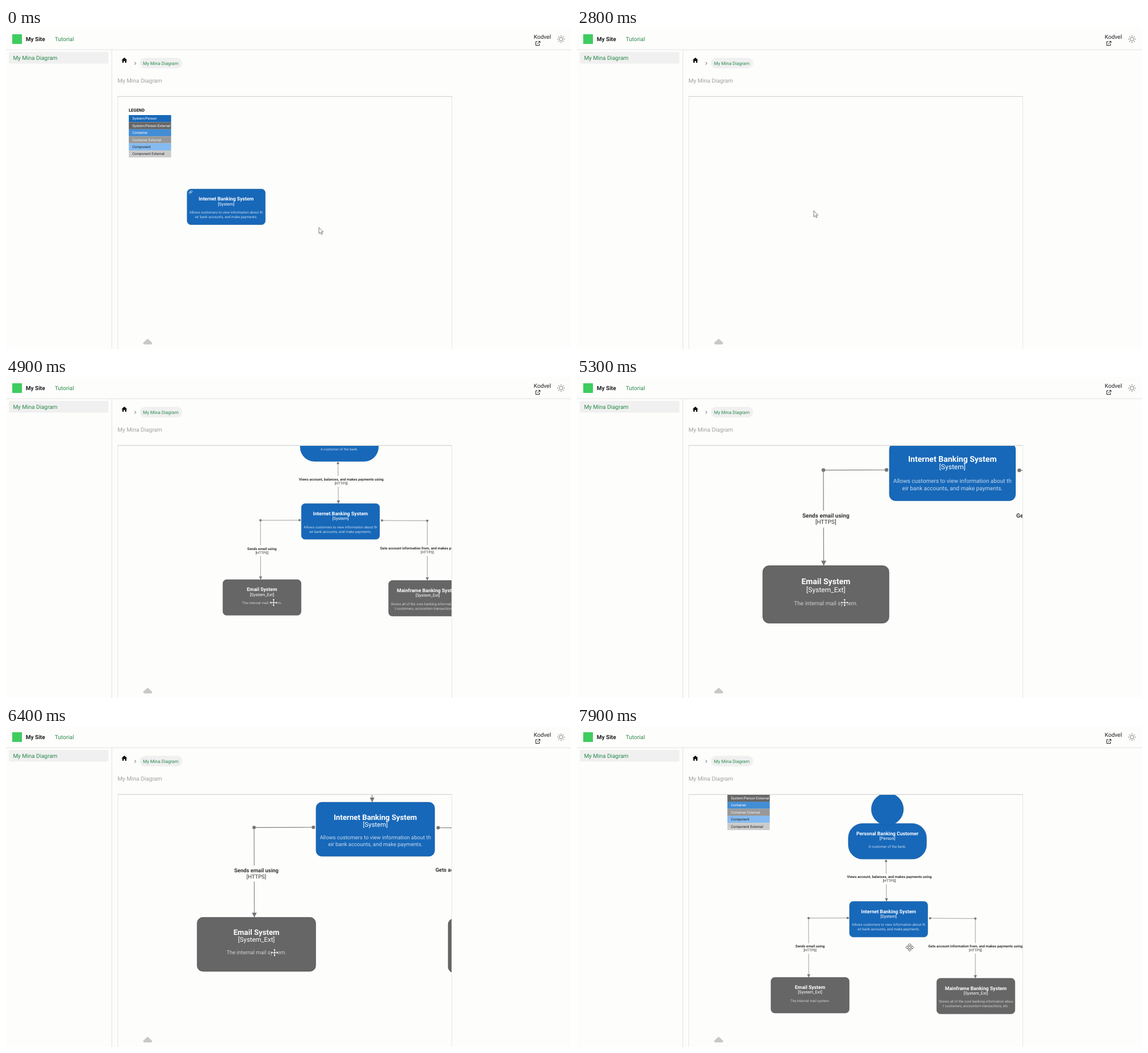
Animation, 993 px wide and 564 px high, one loop 8 s. Source, as an HTML page:

```html
<!DOCTYPE html>
<html lang="en">
<head>
<meta charset="utf-8">
<title>My Site</title>
<style>
  html, body { margin: 0; width: 100%; height: 100%; overflow: hidden; background: #fdfdfb; }
  svg { display: block; }
  text { font-family: Roboto, Arial, sans-serif; text-rendering: geometricPrecision; }
  .b { font-weight: 700; }
  .mid { text-anchor: middle; }
  .green { fill: #2a8a4e; }
  .line { fill: none; stroke: #808080; stroke-width: .75; }
</style>
</head>
<body>
<svg id="stage" width="993" height="564" viewBox="0 0 993 564">
  <defs>
    <clipPath id="pane"><rect x="197" y="121" width="586" height="443"/></clipPath>
  </defs>
  <rect width="993" height="564" fill="#fdfdfb"/>

  <!-- header -->
  <rect y="37.5" width="993" height="1" fill="#e3e3e8"/>
  <rect y="38.5" width="993" height="1" fill="#f5f5f5"/>
  <rect x="11" y="11" width="17" height="17" fill="#3ecc5f"/>
  <text class="b" x="34.8" y="23.2" font-size="10" fill="#1c1e21">My Site</text>
  <text class="green" x="85.8" y="23.2" font-size="10">Tutorial</text>
  <text x="927.6" y="18.8" font-size="10" fill="#1c1e21">Kodvel</text>
  <path d="M934 24h-3v6.6h6.6v-3M935.5 23.4h3v3M938.2 23.7l-4.6 4.6" fill="none" stroke="#1c1e21" stroke-width="1"/>
  <g id="sun" stroke="#777" fill="none" stroke-width="1"><circle cx="975.5" cy="19.5" r="3"/></g>

  <!-- sidebar -->
  <rect x="185.5" y="38" width="1" height="526" fill="#e2e3de"/>
  <rect x="5" y="42" width="175" height="20.5" rx="2.5" fill="#f0f0f0"/>
  <text class="green" x="12.4" y="55.9" font-size="10">My Mina Diagram</text>

  <!-- breadcrumbs -->
  <path d="M208 52l5 4.6h-1.4v4.4h-2.5v-3h-2.2v3h-2.5v-4.4h-1.4z" fill="#111"/>
  <path d="M226 59.8l2.3 2.4-2.3 2.4" fill="none" stroke="#555" stroke-width="1"/>
  <rect x="235" y="52.5" width="74.8" height="18.5" rx="9.25" fill="#f0f0f0"/>
  <text class="green" x="240.8" y="65" font-size="8">My Mina Diagram</text>
  <text x="196" y="95.8" font-size="10.05" fill="#a0a0a4">My Mina Diagram</text>

  <!-- diagram pane -->
  <g clip-path="url(#pane)">
    <g id="intro"></g>
    <g id="chart"></g>
  </g>
  <path d="M196.5 564V120.5M783.5 120.5V564" stroke="#e6e6e4" fill="none"/>
  <path d="M196 120.4H784" stroke="#d4d4d4" stroke-width="1.4"/>
  <path d="M249 546.4l7.4 6.6q.6 2.2-1.6 2.4h-11.6q-2.2-.2-1.6-2.4z" fill="#c8c8c8" stroke="#c8c8c8" stroke-linejoin="round"/>

  <!-- pointers -->
  <path id="arrow" d="M0 0V10.8L2.5 8.6L4.3 12.4L6 11.6L4.3 7.9H7.6Z" fill="#fff" stroke="#555" stroke-width=".8"/>
  <path id="move" d="M0-7L3-4H1V-1H4V-3L7 0L4 3V1H1V4H3L0 7L-3 4H-1V1H-4V3L-7 0L-4-3V-1H-1V-4H-3Z" fill="#fff" stroke="#444" stroke-width=".8"/>
</svg>
<script>
const $ = id => document.getElementById(id);
const NS = 'http://www.w3.org/2000/svg';
const BOX_W = 137.4, BOX_H = 62.5;
const BLUE = '#1768b9', GRAY = '#666666', BG = '#fdfdfb', INK = '#333';

function add(parent, tag, attrs, label) {
  const el = document.createElementNS(NS, tag);
  for (const k in attrs) el.setAttribute(k, attrs[k]);
  if (label) el.textContent = label;
  parent.appendChild(el);
  return el;
}

function write(g, x, y, size, fill, label, cls = 'mid') {
  add(g, 'text', { x, y, 'font-size': size, fill, class: cls }, label);
}

function node(g, x, y, fill, title, kind, lines, person) {
  const stroke = fill === BLUE ? '#125aa3' : '#505054';
  const cx = x + BOX_W / 2;
  const look = { fill, stroke, 'stroke-width': .6 };
  add(g, 'rect', { x, y, width: BOX_W, height: BOX_H, rx: person ? 25 : 6.5, ...look });
  if (person) add(g, 'circle', { cx, cy: y - 25.2, r: 28.2, ...look });
  write(g, cx, y + 20.4, 8.72, '#fff', title, 'b mid');
  write(g, cx, y + 28.5, 7.49, '#fff', kind);
  lines.forEach((s, i) => write(g, cx, y + 43 + i * 8.1, 6.245, fill === BLUE ? '#c6d9ec' : '#cfcfcf', s));
}

// Polyline with round joints, an arrow at the end and a two-line caption.
function edge(g, pts, lx, ly, label) {
  const [ex, ey] = pts[pts.length - 1];
  add(g, 'polyline', { points: pts.join(' '), class: 'line' });
  pts.slice(0, -1).forEach(([cx, cy]) => add(g, 'circle', { cx, cy, r: 2, fill: '#777' }));
  add(g, 'path', { d: `M${ex} ${ey}l-2.8-5.5h5.6z`, fill: '#777' });
  add(g, 'rect', { x: lx - 20, y: ly - 7.6, width: 40, height: 18.5, fill: BG });
  write(g, lx, ly, 6.245, INK, label, 'b mid');
  write(g, lx, ly + 7.1, 6.245, INK, '[HTTPS]');
}

function legend(g, x, y) {
  write(g, x, y - 5.8, 7.49, '#111', 'LEGEND', 'b');
  const rows = [
    ['System/Person', BLUE, '#fff'], ['System/Person External', GRAY, '#fff'],
    ['Container', '#438dd5', '#fff'], ['Container External', '#999', '#f2f2f2'],
    ['Component', '#85bbf0', '#222'], ['Component External', '#ccc', '#222']
  ];
  rows.forEach(([s, fill, ink], i) => {
    const top = y + i * 12.4;
    add(g, 'rect', { x, y: top, width: 74.4, height: 12.45, fill });
    write(g, x + 6.2, top + 8.3, 6.245, ink, s, '');
  });
}

const bank = (g, x, y) => node(g, x, y, BLUE, 'Internet Banking System', '[System]',
  ['Allows customers to view information about th', 'eir bank accounts, and make payments.']);

function build() {
  const intro = $('intro'), chart = $('chart');
  legend(intro, 215.8, 153);
  bank(intro, 318.3, 283);
  const link = add(intro, 'g', { transform: 'translate(324.4 288.4) rotate(-35)', fill: 'none', stroke: '#cfe6dc', 'stroke-width': .8 });
  for (const x of [-3.4, -.6]) add(link, 'rect', { x, y: -1.4, width: 4, height: 2.8, rx: 1.4 });

  legend(chart, 220.2, 143);
  edge(chart, [[499, 272], [499.8, 343]], 504.7, 302, 'Views account, balances, and makes payments using');
  edge(chart, [[431.6, 372], [362.8, 372.2], [363.1, 476.5]], 365.4, 424, 'Sends email using');
  edge(chart, [[576.4, 372.5], [656, 373], [656, 478]], 656, 423.7, 'Gets account information from, and makes payments using');
  node(chart, 432.7, 206.1, BLUE, 'Personal Banking Customer', '[Person]', ['A customer of the bank.'], true);
  bank(chart, 434.8, 343);
  node(chart, 296.8, 476.5, GRAY, 'Email System', '[System_Ext]', ['The internal mail system.']);
  node(chart, 588.1, 478, GRAY, 'Mainframe Banking System', '[System_Ext]',
    ['Stores all of the core banking information abou', 't customers, accountsm transactions, etc.']);

  for (let i = 0; i < 8; i++)
    add($('sun'), 'path', { d: 'M975.5 15v-2.2', transform: `rotate(${i * 45} 975.5 19.5)` });
}

const LOOP = 8000, STEP = 100;
const LEAVE = 2500, READY = 3100, ZOOM = 2.597;
const PAN_A = [84.4, -120.4], PAN_B = [-41.3, 84.5];
const HUB_A = [470.3, 396.1], HUB_B = [472, 398];

// time, x, y of the pointer hot spot
const PATH = [
  [0, 550, 350.5], [1200, 325, 289], [2400, 325, 289], [2800, 416, 321],
  [3500, 512, 428], [4100, 515, 432.5], [4400, 386, 516.6], [4800, 470.3, 396.3],
  [5900, 470.3, 396.3], [6200, 472, 398.2], [6800, 472, 398.2], [7200, 626, 304.5], [7900, 584.7, 389]
];

const ease = p => p * p * (3 - 2 * p);
const part = (t, a, b) => Math.min(1, Math.max(0, (t - a) / (b - a)));

function pointer(t) {
  let i = 0;
  while (i < PATH.length - 2 && t >= PATH[i + 1][0]) i++;
  const [a, x, y] = PATH[i], [b, u, v] = PATH[i + 1];
  const p = ease(part(t, a, b));
  return [x + (u - x) * p, y + (v - y) * p];
}

function view(t) {
  const a = ease(part(t, 4400, 4800)), b = ease(part(t, 7200, 7900));
  let k = 1, x = PAN_A[0] * a, y = PAN_A[1] * a;
  const zoom = (f, [cx, cy]) => { k *= f; x = cx + (x - cx) * f; y = cy + (y - cy) * f; };
  zoom(ZOOM ** part(t, 5000, 5600), HUB_A);
  zoom(ZOOM ** -part(t, 5900, 6785), HUB_B);
  return [k, 0, 0, k, x + PAN_B[0] * b, y + PAN_B[1] * b];
}

const show = (id, on) => $(id).setAttribute('visibility', on ? 'visible' : 'hidden');

function draw(t) {
  show('intro', t < LEAVE);
  show('chart', t >= READY);
  show('arrow', t < READY);
  show('move', t >= READY);
  $('chart').setAttribute('transform', `matrix(${view(t)})`);
  const at = `translate(${pointer(t)})`;
  $('arrow').setAttribute('transform', at);
  $('move').setAttribute('transform', at);
}

build();
draw(0);
const start = performance.now();
(function tick() {
  const t = (performance.now() - start) % LOOP;
  draw(Math.floor(t / STEP) * STEP);
  requestAnimationFrame(tick);
})();
</script>
</body>
</html>
```
